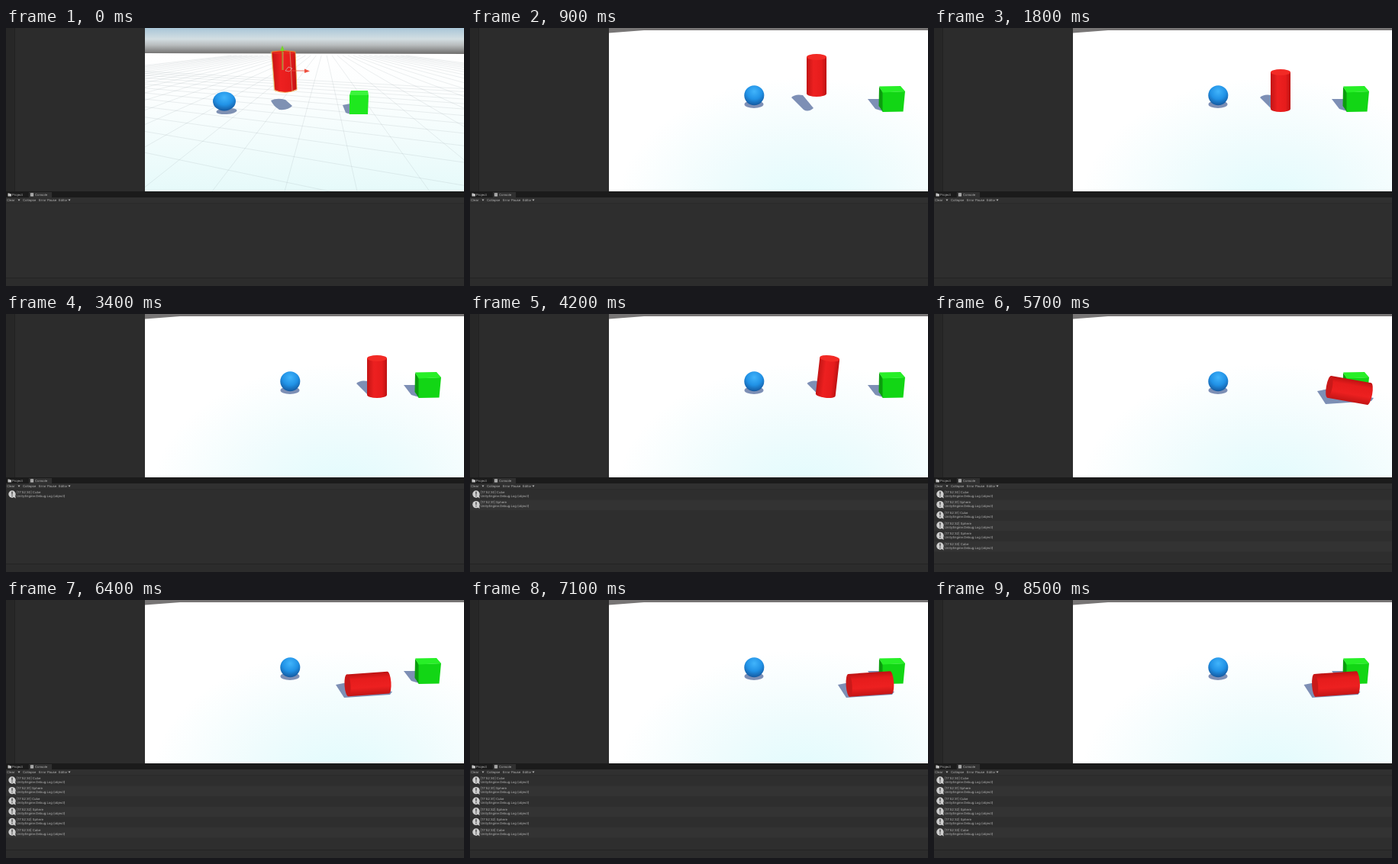
An HTML page for the animation above (9.1 s loop, 600 by 338 pixels).

```html
<!DOCTYPE html>
<html lang="en">
<head>
<meta charset="utf-8">
<title>Collision log</title>
<style>
html, body { margin: 0; width: 100%; height: 100%; overflow: hidden; background: #2c2c2c; }
svg { display: block; width: 100vw; height: 100vh; }
text { font: 4.2px Inter, Roboto, sans-serif; fill: #b9b9b9; text-rendering: geometricPrecision; white-space: pre; }
</style>
</head>
<body>
<svg viewBox="0 0 600 338" preserveAspectRatio="none">
  <defs>
    <linearGradient id="sky" x2="0" y2="1">
      <stop stop-color="#a9c6d8"/><stop offset=".4" stop-color="#d3dee2"/>
      <stop offset=".62" stop-color="#b9bdbe"/><stop offset="1" stop-color="#615f5e"/>
    </linearGradient>
    <linearGradient id="floor" x2="0" y2="1">
      <stop stop-color="#fff"/><stop offset=".3" stop-color="#fcfefe"/><stop offset="1" stop-color="#e6fafa"/>
    </linearGradient>
    <radialGradient id="ground" gradientUnits="userSpaceOnUse" cx="440" cy="240" r="250" gradientTransform="translate(0 72) scale(1 .7)">
      <stop stop-color="#e0fbfd"/><stop offset=".5" stop-color="#effcfd"/><stop offset="1" stop-color="#fff"/>
    </radialGradient>
    <radialGradient id="blue" cx=".5" cy=".3" r=".7">
      <stop stop-color="#41b4fb"/><stop offset=".55" stop-color="#2192e6"/><stop offset="1" stop-color="#1459a0"/>
    </radialGradient>
    <linearGradient id="red">
      <stop stop-color="#c31515"/><stop offset=".35" stop-color="#ed2020"/>
      <stop offset=".75" stop-color="#e61c1c"/><stop offset="1" stop-color="#bd1212"/>
    </linearGradient>
    <clipPath id="view"><path d="M182 0H600V214H182Z"/></clipPath>
  </defs>

  <path fill="#2c2c2c" d="M0 0H600V338H0Z"/>
  <path fill="#272727" d="M0 0H11V214H0Z"/>
  <path fill="#222" d="M11 0h1V214h-1Z"/>

  <g id="editor" clip-path="url(#view)">
    <path fill="url(#sky)" d="M182 0H600V36H182Z"/>
    <path fill="url(#floor)" d="M182 33L600 34V214H182Z"/>
    <path id="grid" fill="none" stroke="#8b9a9d" stroke-opacity=".24" stroke-width=".7"/>
    <g fill="#7f91b3">
      <ellipse cx="289" cy="109" rx="13.5" ry="4" transform="rotate(-4 289 109)"/>
      <path d="M347 95Q355 91 366 94L375 102Q370 108 358 107Q350 102 347 95Z"/>
      <path d="M441 101L451 99V113L445 111Z"/>
    </g>
    <ellipse cx="286" cy="96" rx="15" ry="12.5" fill="url(#blue)"/>
    <path fill="#1ee81e" d="M450 88H475L474 113H450Z"/>
    <path fill="#3bf53b" d="M450 88L452 82H474L475 88Z"/>
    <path fill="url(#red)" d="M348 32L352 81Q366 88 381 80L379 32Z"/>
    <ellipse cx="363.5" cy="32" rx="15.5" ry="2.5" fill="#e52a1e"/>
    <path fill="none" stroke="#f39a32" stroke-width=".8" d="M348 31L352 82Q366 87 381 81L379 31Q363 28 348 31Z"/>
    <path fill="none" stroke="#c9dfb0" stroke-width=".5" d="M347 31L351 82M363 31V55M372 31L375 82"/>
    <path fill="none" stroke="#d6d6d6" stroke-width=".6" d="M366 56L370 51L375 53L371 57Z"/>
    <path stroke="#77d62b" stroke-width=".8" d="M362 30V55"/>
    <path fill="#77d62b" d="M359 30L362 23L365 30Z"/>
    <path stroke="#ee5140" stroke-width=".8" d="M372 56H392"/>
    <path fill="#ee5140" d="M391 53.5L398 56.5L391 59Z"/>
  </g>

  <g id="game" clip-path="url(#view)">
    <path fill="#777575" d="M182 0H600V8H182Z"/>
    <path fill="url(#ground)" d="M182 6.5L228 3H600V214H182Z"/>
    <g fill="#7d8fb5">
      <ellipse cx="372" cy="100" rx="12.5" ry="5"/>
      <path d="M521 93H537L541 109L531 106Z"/>
      <path id="shade"/>
    </g>
    <circle cx="372.3" cy="88.3" r="13" fill="url(#blue)"/>
    <path fill="#0b9c0e" d="M536 77L541 84V110L535.5 102Z"/>
    <path fill="#12d615" d="M540.5 84L570 83L567.5 109.5L540.5 110Z"/>
    <path fill="#27ef27" d="M536 76.5L564 76L570 83L540.5 84.5Z"/>
    <g id="can"><path id="side" fill="url(#red)"/><ellipse id="cap"/></g>
  </g>

  <path fill="#1b1b1b" d="M0 214H600V222H0Z"/>
  <path fill="#303030" d="M30 215H60V222H30ZM0 222H600V230H0Z"/>
  <path fill="#242424" d="M0 229.5H600V230H0ZM0 327H600V328H0Z"/>
  <path fill="#2e2e2e" d="M0 230H600V327H0Z"/>
  <path fill="#c4c4c4" d="M2.5 216.5H4.5L5 217.2H7V220.4H2.5ZM32 216.2H36V220.4H32Z"/>
  <path stroke="#555" stroke-width=".5" d="M32.7 217.6H35.3M32.7 219H35.3"/>
  <text x="8" y="220">Project</text><text x="38" y="220">Console</text>
  <text x="1" y="227">Clear</text><text x="22" y="227">Collapse</text>
  <text x="43" y="227">Error Pause</text><text x="69" y="227">Editor</text>
  <path fill="#b9b9b9" d="M15.5 224.5H18.5L17 226.7ZM81.5 224.5H84.5L83 226.7Z"/>
  <g id="logs"></g>
</svg>
<script>
const $ = id => document.getElementById(id);
const set = (id, attrs) => { for (const k in attrs) $(id).setAttribute(k, attrs[k]); };

const LOOP = 9100, STEP = 100, PLAY = 800;

// time, centre x, centre y, tilt, half width, easing into this pose
const poses = [
  [900, 454, 62, 0, 13], [1500, 454, 82, 0, 13, 'in'], [2400, 454, 82, 0, 13],
  [3000, 523, 82, 0, 13, 'in'], [3400, 486, 82, 0, 13],
  [3700, 400, 82, -4, 13], [4200, 468.5, 82, 6.5, 13], [4400, 523, 82, 3, 13],
  [4800, 402, 80, -6, 13], [5000, 360, 69, -8, 14], [5200, 315, 81.5, -5, 15],
  [5300, 344, 82, -2, 14], [5400, 520, 82, 2, 13], [5500, 548, 86, -30, 14],
  [5700, 544, 100, -80, 14.5], [6400, 474, 110, -94, 14.5, 'out'],
  [7300, 526.5, 110, -94, 15, 'out']
];

// time, clock second, object touched
const hits = [
  [3000, 30, 'Cube'], [3700, 31, 'Sphere'], [4400, 31, 'Cube'],
  [4800, 32, 'Sphere'], [5300, 32, 'Sphere'], [5400, 33, 'Cube']
];

const ease = { in: k => k * k, out: k => 1 - (1 - k) ** 2 };

function poseAt(t) {
  const i = poses.findIndex(p => p[0] > t);
  if (i < 0) return poses.at(-1);
  if (i === 0) return poses[0];
  const a = poses[i - 1], b = poses[i];
  const raw = (t - a[0]) / (b[0] - a[0]);
  const k = b[5] ? ease[b[5]](raw) : raw;
  return a.slice(0, 5).map((v, n) => v + (b[n] - v) * k);
}

function gridPath() {
  let d = '';
  for (let x = -1250; x < 1900; x += 95) {
    const k = 14 / 192;
    d += `M${417 + (x - 417) * k} 36L${x} 214`;
  }
  for (let i = 1; i < 14; i++) {
    const slope = 0.21 / (1 + (i - 1) * 0.24);
    d += `M182 ${20 + slope * 682}L600 ${20 + slope * 1100}`;
  }
  return d;
}

function drawCan(t) {
  const [, x, y, tilt, w] = poseAt(t);
  const h = 24 + (w - 13) * 1.7, lying = tilt < -55;
  set('can', { transform: `translate(${x} ${y}) rotate(${tilt})` });
  set('side', { d: `M${-w} ${-h}V${h}A${w} 4 0 0 0 ${w} ${h}V${-h}Z` });
  set('cap', { cy: -h, rx: w, ry: 4, fill: lying ? '#c91919' : '#f22a25' });
  const ground = lying ? y : 82;
  const shape = lying ? 'M-42 1L-27 -2L32 10L29 14L-31 18Z'
    : x < 350 ? 'M-9 29A14 5 -8 0 1 18 27A14 5 -8 0 1 -9 32Z'
    : 'M-27 9Q-22 4 -12 6L2 23Q-5 29 -11 25Z';
  set('shade', { d: shape, transform: `translate(${x - (82 - Math.min(y, 82)) * .3} ${ground})` });
}

function draw(now) {
  const t = Math.floor(now % LOOP / STEP) * STEP;
  const playing = t >= PLAY;
  set('editor', { display: playing ? 'none' : 'inline' });
  set('game', { display: playing ? 'inline' : 'none' });
  if (playing) drawCan(t);
  hits.forEach(([at], i) => $('logs').children[i].setAttribute('display', t >= at ? 'inline' : 'none'));
  requestAnimationFrame(draw);
}

set('grid', { d: gridPath() });
$('logs').innerHTML = hits.map(([, sec, name], i) => `<g transform="translate(0 ${i * 13.6})">
  <path fill="${i % 2 ? '#333' : '#2e2e2e'}" d="M0 230H600V243.5H0Z"/>
  <circle cx="8" cy="236" r="4.7" fill="#cfcfcf"/><path fill="#cfcfcf" d="M9 239L12.6 241.5L12 236Z"/>
  <path fill="#2b2b2b" d="M7.3 232.8H8.7L8.4 237H7.6ZM7.4 237.8H8.6V239H7.4Z"/>
  <text x="14" y="234.8">[17:52:${sec}] ${name}</text>
  <text x="14" y="239.9">UnityEngine.Debug.Log (object)</text></g>`).join('');
const start = performance.now();
requestAnimationFrame(() => draw(0));
const baseDraw = draw;
draw = now => baseDraw(Math.max(0, now - start));
</script>
</body>
</html>
```
